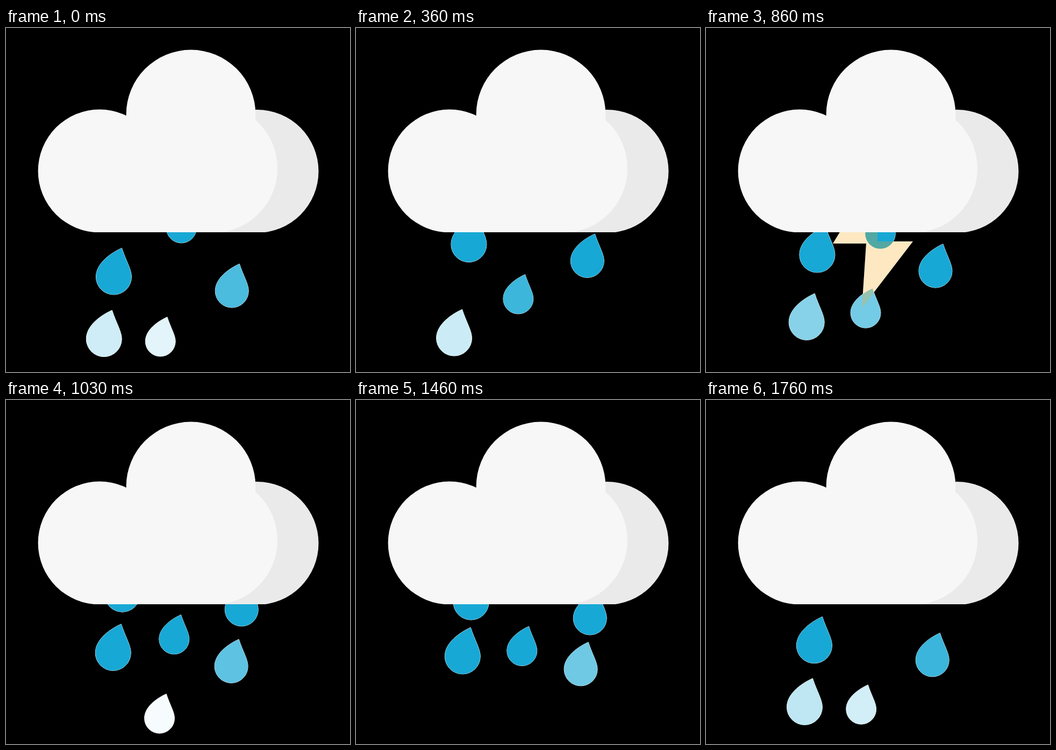
Animation, 640 px wide and 640 px high, one loop 1780 ms. Source, as an HTML page with a canvas:

```html
<!DOCTYPE html>
<html lang="en">
<head>
<meta charset="utf-8">
<title>Rain cloud</title>
<style>
html, body { margin: 0; width: 100%; height: 100%; overflow: hidden; background: #000; }
canvas { display: block; width: 100vw; height: 100vh; object-fit: contain; }
</style>
</head>
<body>
<canvas id="stage" width="640" height="640"></canvas>
<script>
const ctx = document.getElementById('stage').getContext('2d');
const LOOP = 1780, STEP = LOOP / 83, FADE = 305;
const BURSTS = [0, 421, 828, 1197];
const BLUE = '#18a8d5', AMBER = '#f7a516';

const dropPath = new Path2D(
  'M15-53.5C-4-45-33-26-33 0A33 33 0 0 0 33 0C33-14 22.5-30 15-53.5Z');
const boltPath = new Path2D(
  'M261 360L236 401H298L290 521L385 397H319V360Z');

// r: radius, end: age when gone, x/y: lowest point of the drop
const columns = [
  { r: 33, end: 1016, x: y => 200.3 - 0.157 * (y - 497),
    y: a => 391.5 + 0.267 * (a - 190) + 6.2e-5 * (a - 190) * (a - 600) },
  { r: 28, end: 620, x: y => 326.3 - 0.185 * (y - 400),
    y: a => 400 + 0.362 * a },
  { r: 31, end: 820, x: y => 439.3 - 0.181 * (y - 415),
    y: a => 421 + 0.2595 * (a - 202) - 3e-5 * (a - 202) * (a - 609) }
];

const clamp = v => Math.max(0, Math.min(1, v));

function dropsAt(t) {
  const drops = [];
  for (const start of BURSTS) {
    let age = t - start;
    if (age < -100) age += LOOP;
    for (const c of columns) {
      const alpha = clamp((c.end - age) / FADE);
      const y = c.y(age);
      if (alpha > 0 && y > 370) drops.push({ x: c.x(y), y: y - c.r, k: c.r / 33, alpha });
    }
  }
  return drops;
}

function fillDrop(d, color, alpha, rim) {
  ctx.save();
  ctx.translate(d.x, d.y);
  ctx.scale(d.k, d.k);
  ctx.globalAlpha = alpha;
  ctx.fillStyle = ctx.strokeStyle = color;
  ctx.fill(dropPath);
  if (rim) ctx.stroke(dropPath);
  ctx.restore();
}

function fillBolt(color, alpha) {
  ctx.globalAlpha = alpha;
  ctx.fillStyle = color;
  ctx.fill(boltPath);
  ctx.globalAlpha = 1;
}

function blob(color, circles, [x, y, w, h]) {
  ctx.fillStyle = color;
  ctx.beginPath();
  for (const [cx, cy, r] of circles) {
    ctx.moveTo(cx + r, cy);
    ctx.arc(cx, cy, r, 0, 7);
  }
  ctx.fill();
  ctx.fillRect(x, y, w, h);
}

function drawCloud() {
  ctx.save();
  ctx.beginPath();
  ctx.rect(0, 0, 640, 380);
  ctx.clip();
  blob('#eaeaea', [[467, 266.5, 114.5]], [380, 266, 87, 114]);
  blob('#f7f7f7', [[174, 266, 114.4], [344, 161, 120.4], [385, 261, 120]], [174, 200, 211, 180]);
  ctx.restore();
}

function draw(t) {
  ctx.clearRect(0, 0, 640, 640);
  const drops = dropsAt(t);
  const flash = clamp(Math.min((t - 650) / 115, (890 - t) / 125));

  // Fading shapes turn white rather than see-through
  if (flash > 0) fillBolt('#fff', 1);
  for (const d of drops) fillDrop(d, '#fff', 1, true);
  for (const d of drops) fillDrop(d, BLUE, d.alpha);
  if (flash > 0) fillBolt(AMBER, flash);
  drawCloud();
}

const begin = performance.now();
function tick() {
  const t = (performance.now() - begin) % LOOP;
  draw(Math.min(82, Math.floor(t / STEP + 0.3)) * STEP);
  requestAnimationFrame(tick);
}
tick();
</script>
</body>
</html>
```
